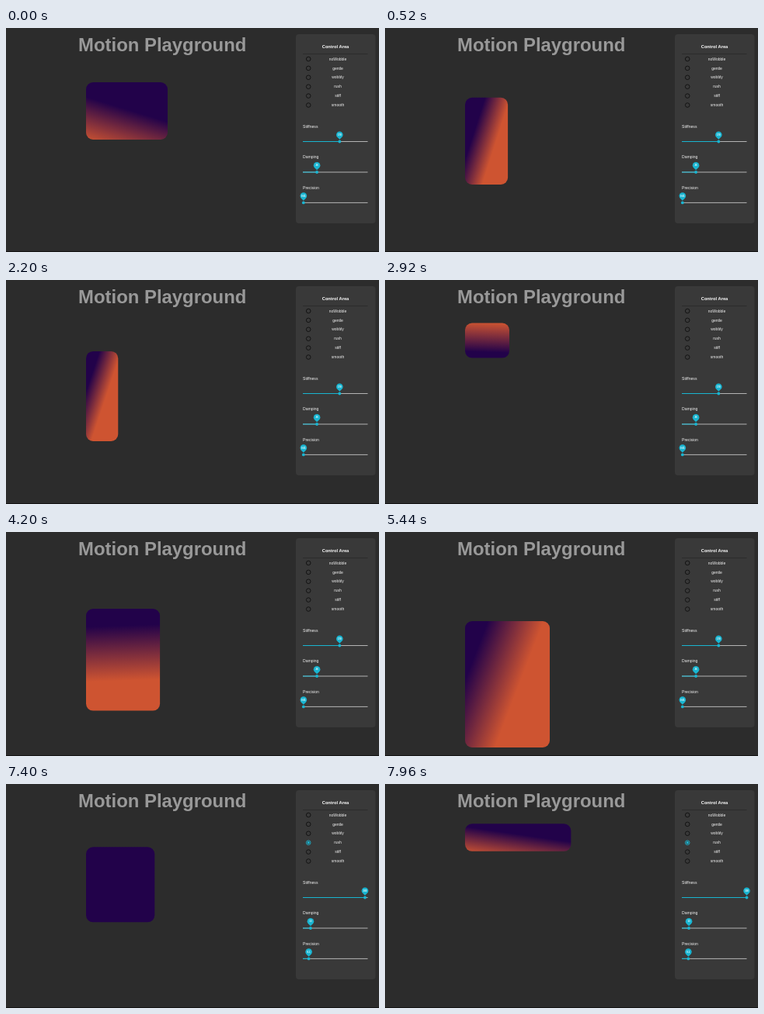
An HTML page with a canvas that plays this animation: 480 px wide and 289 px high, repeating every 8000 ms.

```html
<!DOCTYPE html>
<html lang="en">
<head>
<meta charset="utf-8">
<title>Motion Playground</title>
<style>
html, body { margin: 0; width: 100%; height: 100%; overflow: hidden; background: #2c2c2c; }
canvas { display: block; width: 480px; height: 289px; }
</style>
</head>
<body>
<canvas id="stage" width="480" height="289"></canvas>
<script>
const ctx = document.getElementById('stage').getContext('2d');
const LOOP = 8000;
const TEAL = '#19b5d1';
const FONT = '"Liberation Sans", Arial, sans-serif';

// Box: width, height, top, gradient angle (deg), purple stop, orange stop
const start = [105, 74, 70, 197, 0.48, 1.02];
const soft = { k: 170, c: 26 };
const rush = { k: 300, c: 13 };
const moves = [
  { at: 310, spring: soft, to: [39.5, 124, 96, 80, 0.22, 0.52] },
  { at: 2160, spring: soft, to: [57, 45, 55.5, 362, 0.18, 1] },
  { at: 4002, spring: soft, to: [109, 163, 115, 111, 0.17, 0.59] },
  { at: 5760, spring: soft, to: [88.3, 97, 81.3, 150, 1.1, 1.5] },
  { at: 7690, spring: rush, to: [131, 42.4, 54.6, 184, 0.5, 1.09] }
];

const presets = ['noWobble', 'gentle', 'wobbly', 'rush', 'stiff', 'smooth'];
const PICK = 7250;
const sliders = [
  { name: 'Stiffness', y: 146.5, max: 300, from: 170, to: 300 },
  { name: 'Damping', y: 186, max: 120, from: 26, to: 13 },
  { name: 'Precision', y: 225.4, max: 1, from: 0.01, to: 0.1 }
];

// Remaining share of a damped spring after t seconds
function remain({ k, c }, t) {
  const d = c / 2, w = Math.sqrt(k - d * d);
  return Math.exp(-d * t) * (Math.cos(w * t) + d / w * Math.sin(w * t));
}

function boxAt(ms) {
  let box = start;
  for (const { at, spring, to } of moves) {
    if (ms < at) break;
    const r = remain(spring, (ms - at) / 1000);
    box = to.map((v, i) => v + (box[i] - v) * r);
  }
  return box;
}

function mix(a, b, p) {
  return `rgb(${a.map((v, i) => Math.round(v + (b[i] - v) * p)).join()})`;
}

function text(str, x, y, size, color, { bold = false, align = 'center' } = {}) {
  ctx.font = `${bold ? 'bold ' : ''}${size}px ${FONT}`;
  ctx.textAlign = align;
  ctx.textBaseline = 'alphabetic';
  ctx.fillStyle = color;
  ctx.fillText(str, x, y);
}

function round(x, y, w, h, r, fill) {
  ctx.beginPath();
  ctx.roundRect(x, y, w, h, r);
  ctx.fillStyle = fill;
  ctx.fill();
}

function dot(x, y, r, fill) {
  ctx.beginPath();
  ctx.arc(x, y, r, 0, Math.PI * 2);
  ctx.fillStyle = fill;
  ctx.fill();
}

function line(x1, x2, y, width, color) {
  ctx.fillStyle = color;
  ctx.fillRect(x1, y - width / 2, x2 - x1, width);
}

function drawBox(ms) {
  const [w, h, top, deg, p, q] = boxAt(ms);
  const a = deg * Math.PI / 180, sx = Math.sin(a), sy = -Math.cos(a);
  const len = Math.abs(w * sx) + Math.abs(h * sy);
  const cx = 103 + w / 2, cy = top + h / 2;
  const at = s => [cx + sx * len * (s - 0.5), cy + sy * len * (s - 0.5)];
  const g = ctx.createLinearGradient(...at(p), ...at(q));
  const purple = [34, 2, 74], orange = [206, 84, 49];
  g.addColorStop(0, mix(purple, orange, 0));
  g.addColorStop(1, mix(purple, orange, 1));
  round(103, top, w, h, 9, g);
}

function drawRadio(name, i, picked) {
  const y = 40 + i * 11.9;
  ctx.beginPath();
  ctx.arc(389.2, y, 2.8, 0, Math.PI * 2);
  ctx.lineWidth = 0.9;
  ctx.strokeStyle = picked ? TEAL : '#101010';
  ctx.stroke();
  if (picked) dot(389.2, y, 1.6, TEAL);
  text(name, 427, y + 1.6, 5, '#f4f4f4');
}

function drawPin(x, y, label) {
  const cy = y - 8.8, r = 4.3;
  ctx.beginPath();
  ctx.arc(x, cy, r, Math.PI * 0.75, Math.PI * 0.25);
  ctx.lineTo(x, cy + r * Math.SQRT2);
  ctx.closePath();
  ctx.fillStyle = TEAL;
  ctx.fill();
  text(label, x, cy + 1, 2.9, '#fff', { bold: true });
}

function drawSlider({ name, y, max, from, to }, ms) {
  const p = Math.min(1, Math.max(0, (ms - PICK) / 280));
  const ease = 1 - (1 - p) ** 3;
  const x = 382 + 83.5 * (from + (to - from) * ease) / max;
  text(name, 382, y - 17.8, 5.1, '#f4f4f4', { align: 'left' });
  line(382, 465.5, y, 1, '#b4b4b4');
  line(382, x, y, 1, TEAL);
  dot(x, y, 1.9, TEAL);
  drawPin(x, y, String(ms < PICK ? from : to));
}

function draw(ms) {
  ctx.fillStyle = '#2c2c2c';
  ctx.fillRect(0, 0, 480, 289);
  line(0, 480, 288.5, 1, '#141414');
  text('Motion Playground', 201.2, 29.5, 23.9, '#999', { bold: true });
  drawBox(ms);
  round(373, 8, 102.5, 244, 4, '#393939');
  text('Control Area', 424, 26, 5.7, '#fff', { bold: true });
  line(382, 465.5, 33.5, 0.8, '#292929');
  presets.forEach((name, i) => drawRadio(name, i, name === 'rush' && ms >= PICK));
  sliders.forEach(s => drawSlider(s, ms));
}

const t0 = performance.now();
function frame() {
  draw((performance.now() - t0) % LOOP);
  requestAnimationFrame(frame);
}
frame();
</script>
</body>
</html>
```
